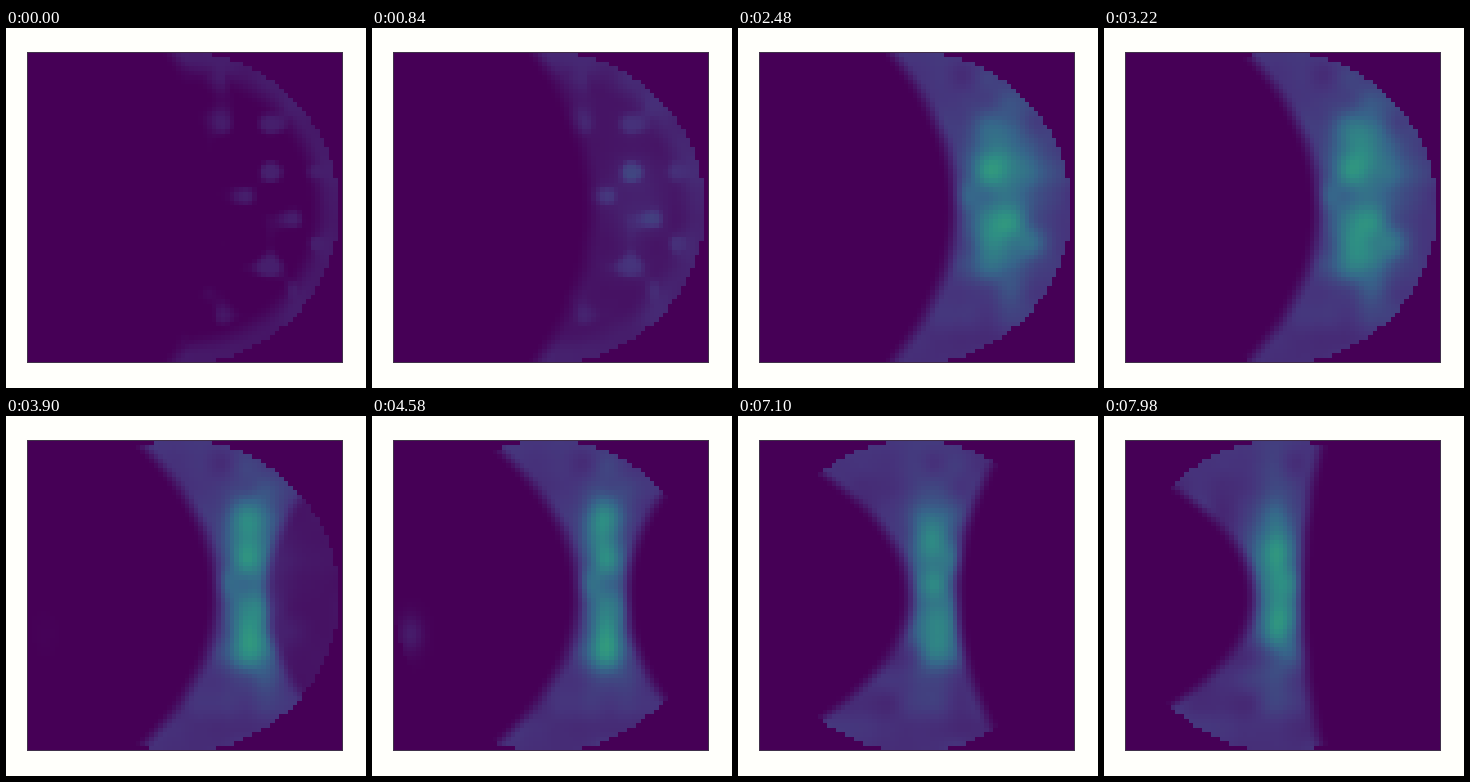
An HTML page with a canvas that plays this animation: 360 px wide and 360 px high, repeating every 8 s.

```html
<!DOCTYPE html>
<html lang="en">
<head>
<meta charset="utf-8">
<title>Heat map</title>
<style>
html, body { margin: 0; width: 100%; height: 100%; overflow: hidden; background: #fffffb; }
canvas { position: absolute; left: 22px; top: 25px; width: 314px; height: 309px; outline: 1px solid #40304a; image-rendering: pixelated; }
</style>
</head>
<body>
<canvas id="map" width="70" height="69"></canvas>
<script>
const LOOP = 8000, LAST_STEP = 171;
const COLS = 70, ROWS = 69;
const BOX = { x: 22, y: 25, w: 314, h: 309 };
const DISC = { x: 177, y: 180, r: 155.5 };

// Evenly spaced colours, from no signal to the strongest
const RAMP = [[70, 0, 86], [70, 52, 124], [54, 102, 138], [46, 142, 132], [58, 176, 112]];
const RAMP_STEP = .165;

const ctx = document.getElementById("map").getContext("2d");
const image = ctx.createImageData(COLS, ROWS);

const mix = (a, b, k) => a + (b - a) * k;
const clamp = (v, lo, hi) => Math.min(hi, Math.max(lo, v));
const smooth = k => { k = clamp(k, 0, 1); return k * k * (3 - 2 * k); };
const glow = (dx, dy, w, h) => Math.exp(-.8 * ((dx / w) ** 2 + (dy / h) ** 2));

function hash(i, j) {
  const v = Math.sin(i * 127.1 + j * 311.7) * 43758.5453;
  return v - Math.floor(v);
}

// Smooth seeded noise in 0..1
function noise(x, y) {
  const i = Math.floor(x), j = Math.floor(y);
  const kx = smooth(x - i), ky = smooth(y - j);
  return mix(mix(hash(i, j), hash(i + 1, j), kx),
             mix(hash(i, j + 1), hash(i + 1, j + 1), kx), ky);
}

function colorOf(value) {
  const at = clamp(value / RAMP_STEP, 0, RAMP.length - 1.001);
  const i = Math.floor(at);
  return RAMP[i].map((c, n) => mix(c, RAMP[i + 1][n], at - i));
}

// Every 140 ms holds one long step and two short ones
function stepAt(time) {
  const rest = time % 140;
  return Math.floor(time / 140) * 3 + (rest < 100 ? 0 : rest < 120 ? 1 : 2);
}

function poseAt(step) {
  const k = step / LAST_STEP;
  const open = 1 - smooth((step - 66) / 30);
  const waist = 220 - 70 * k ** 3;
  return {
    step, open, waist,
    dawn: smooth(step / 42),
    sag: 55 + 110 * k * k,
    flare: 90 - 70 * k ** 4,
    core: mix(waist + 25, waist + 45, open),
    coreWidth: mix(22, 42, open),
    strength: smooth((step + 8) / 75),
    spread: 27 + 32 * Math.sin(Math.PI * (step - 34) / 150),
    side: .09 * smooth((step - 80) / 17) * smooth((145 - step) / 20)
  };
}

function valueAt(x, y, p) {
  const fromCenter = Math.hypot(x - DISC.x, y - DISC.y);
  if (fromCenter > DISC.r) return 0;

  const u2 = ((y - DISC.y) / DISC.r) ** 2;
  const left = p.waist - p.sag * u2;
  const right = p.waist + 48 + p.flare * u2;
  const clouds = noise(x / 24 + p.step * .012, y / 24);

  const rim = smooth((fromCenter - DISC.r + 32) / 26);
  const patches = smooth((clouds - .5) / .35);
  const dim = Math.max(rim, patches) * .55;

  const band = smooth((x - left + 12) / 24)
             * mix(smooth((right - x + 10) / 20), 1, p.open)
             * mix(dim, 1, p.dawn);
  const dx = x - p.core;
  const body = .12 + .06 * clouds
    + p.strength * .24 * glow(dx, y - 172, p.coreWidth, 82) * (.7 + .6 * clouds);
  const humpWidth = mix(17, 24, p.open);
  const humps = glow(dx + 3, y - 170 + p.spread, humpWidth, 25)
              + glow(dx - 2, y - 170 - p.spread, humpWidth, 25);

  return band * (body + p.strength * .2 * humps)
       + p.side * glow(x - 39, y - 218, 11, 17);
}

function draw(step) {
  const pose = poseAt(step);
  for (let row = 0, p = 0; row < ROWS; row++) {
    const y = BOX.y + (row + .5) * BOX.h / ROWS;
    for (let col = 0; col < COLS; col++, p += 4) {
      const x = BOX.x + (col + .5) * BOX.w / COLS;
      image.data.set([...colorOf(valueAt(x, y, pose)), 255], p);
    }
  }
  ctx.putImageData(image, 0, 0);
}

let shown = 0;
const start = performance.now();
function tick(now) {
  const step = stepAt(Math.max(0, now - start) % LOOP);
  if (step !== shown) draw(shown = step);
  requestAnimationFrame(tick);
}
draw(shown);
requestAnimationFrame(tick);
</script>
</body>
</html>
```
